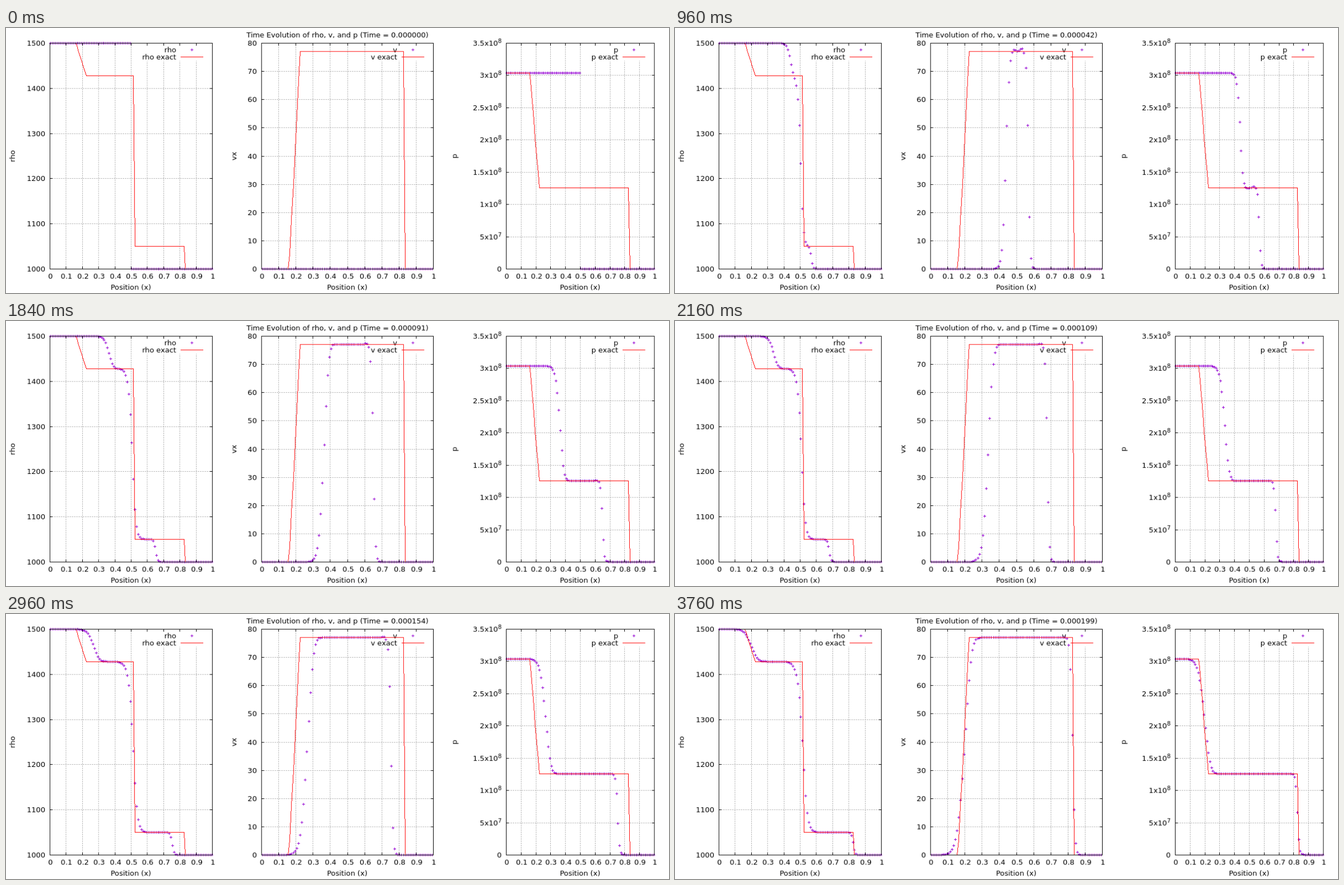
Recreate the animation shown at these times as an HTML page with a canvas. Size 1183 by 473 pixels, loop 3.84 s.

```html
<!DOCTYPE html>
<html lang="en">
<head>
<meta charset="utf-8">
<title>Time Evolution of rho, v, and p</title>
<style>
  html, body { margin: 0; width: 100%; height: 100%; overflow: hidden; background: #fff; }
  canvas { display: block; }
</style>
</head>
<body>
<canvas id="stage" width="1183" height="473"></canvas>
<script>
// The plot is drawn on a 1200 x 480 sheet and scaled smoothly to the stage
const stage = document.getElementById('stage');
const view = stage.getContext('2d');
const sheet = document.createElement('canvas');
sheet.width = 1200;
sheet.height = 480;
const ctx = sheet.getContext('2d');

const TOP = 27, BOTTOM = 436, FONT = 13.1;
const STEP = 80, STEPS = 48, CELLS = 100;

// Stiffened gas shock tube
const G = 7.15, B = 3e8;
const RHO_L = 1500, P_L = 3.04e8, RHO_R = 1000, P_R = 1e5;
const C_L = Math.sqrt(G * (P_L + B) / RHO_L);
const C_R = Math.sqrt(G * (P_R + B) / RHO_R);
const V = 77.06;
const fan = v => 1 - v * (G - 1) / (2 * C_L);
const fanRho = v => RHO_L * fan(v) ** (2 / (G - 1));
const fanP = v => (P_L + B) * fan(v) ** (2 * G / (G - 1)) - B;
const shockP = v => P_R + RHO_R * v * (C_R + 2.13 * v);
const shockRho = v => RHO_R * ((shockP(v) + B) / (P_R + B)) ** (1 / G);
const CONTACT_JUMP = fanRho(V) - shockRho(V);

// Combines the three waves: fan velocity, contact share, shock velocity
function state(vFan, share, vShock) {
  return {
    rho: fanRho(vFan) - CONTACT_JUMP * (1 - share) - shockRho(V) + shockRho(vShock),
    v: vFan * vShock / V,
    p: fanP(vFan) - shockP(V) + shockP(vShock)
  };
}

const softplus = (z, w) => Math.max(z, 0) + w * Math.log1p(Math.exp(-Math.abs(z) / w));
const falling = (z, w) => 1 / (1 + Math.exp(z / w));
const bump = z => Math.exp(-z * z);

// Numerical solution at t microseconds, smeared by the scheme
function numeric(x, t) {
  const r = t / 42, start = 1 - Math.exp(-t / 6);
  const head = 0.5 + 0.0005 * start - 0.001677 * t;
  const tail = 0.5 + 0.01 * start - 0.001381 * t;
  const contact = 0.5 + 0.001 * start + 0.000083 * t;
  const shock = 0.5 + 0.001638 * t;
  const ripple = Math.min(r, 1 / r);

  const ramp = softplus(x - head, 0.01 * r ** 0.38) - softplus(x - tail, 0.0075 * r ** 0.3);
  const vFan = V * ramp / (tail - head) + 0.7 * ripple * bump((x - tail - 0.033) / 0.012);
  const z = x - contact;
  const share = falling(z, (z < 0 ? 0.01075 : 0.00833) * r ** 0.303);
  const vShock = V * falling(x - shock, 0.0038 * t ** 0.1 * start)
    + 1.1 * ripple * bump((x - shock + 0.036) / 0.015);
  return state(vFan, share, vShock);
}

function exact(x) {
  const t = 2e-4, head = 0.5 - C_L * t;
  const tail = head + (G + 1) / 2 * V * t;
  const ramp = Math.min(1, Math.max(0, (x - head) / (tail - head)));
  return state(V * ramp, x < 0.5 + V * t ? 1 : 0, x < 0.5 + 1633 * t ? V : 0);
}

const xs = Array.from({ length: CELLS }, (_, i) => (i + 0.5) / CELLS);
const exactStates = xs.map(exact);

const power = v => {
  if (!v) return ['0', ''];
  const e = Math.floor(Math.log10(v) + 1e-9);
  return [+(v / 10 ** e).toFixed(1) + 'x10', String(e)];
};
const plain = v => [String(v), ''];

const panels = [
  { key: 'rho', axis: 'rho', left: 79, right: 373, min: 1000, max: 1500, tick: 100, label: plain, axisX: 16, keyFrom: 0.6 },
  { key: 'v', axis: 'vx', left: 462, right: 773, min: 0, max: 80, tick: 10, label: plain, axisX: 417, keyFrom: 0.7 },
  { key: 'p', axis: 'p', left: 905, right: 1173, min: 0, max: 3.5e8, tick: 5e7, label: power, axisX: 816, keyFrom: 0.6 }
];

const px = (p, x) => Math.round(p.left + (p.right - p.left) * x);
const py = (p, v) => Math.round(BOTTOM - (BOTTOM - TOP) * (v - p.min) / (p.max - p.min));

function text(s, x, y, align = 'center', size = FONT) {
  ctx.font = size + 'px "DejaVu Sans", sans-serif';
  ctx.textAlign = align;
  ctx.fillText(s, x, y);
}

function dotted(x1, y1, x2, y2) {
  ctx.beginPath();
  ctx.moveTo(x1 + 0.5, y1 + 0.5);
  ctx.lineTo(x2 + 0.5, y2 + 0.5);
  ctx.stroke();
}

// Hard-edged line, one pixel wide
function pixelLine(x1, y1, x2, y2) {
  const n = Math.max(Math.abs(x2 - x1), Math.abs(y2 - y1), 1);
  for (let i = 0; i <= n; i++) {
    ctx.fillRect(Math.round(x1 + (x2 - x1) * i / n), Math.round(y1 + (y2 - y1) * i / n), 1, 1);
  }
}

function plus(x, y) {
  ctx.fillRect(x - 2, y, 5, 1);
  ctx.fillRect(x, y - 2, 1, 5);
}

function eachTick(p, onX, onY) {
  for (let i = 0; i <= 10; i++) onX(i / 10, px(p, i / 10));
  for (let v = p.min; v <= p.max; v += p.tick) onY(v, py(p, v));
}

function drawGrid(p) {
  ctx.strokeStyle = '#a0a0a0';
  ctx.lineWidth = 1;
  ctx.setLineDash([2, 2]);
  eachTick(p,
    (v, x) => {
      if (v > 0 && v < 1) dotted(x, BOTTOM, x, v >= p.keyFrom ? 59 : TOP);
    },
    (v, y) => {
      if (y > TOP && y < BOTTOM) dotted(p.left, y, p.right, y);
    });
  ctx.setLineDash([]);
}

function drawAxes(p) {
  ctx.fillStyle = '#000';
  const w = p.right - p.left, h = BOTTOM - TOP;
  for (const y of [TOP, BOTTOM]) ctx.fillRect(p.left, y, w + 1, 1);
  for (const x of [p.left, p.right]) ctx.fillRect(x, TOP, 1, h + 1);
  eachTick(p,
    (v, x) => {
      ctx.fillRect(x, TOP, 1, 5);
      ctx.fillRect(x, BOTTOM - 4, 1, 5);
      text(String(v), x + 1.5, 453.5);
    },
    (v, y) => {
      ctx.fillRect(p.left, y, 5, 1);
      ctx.fillRect(p.right - 4, y, 5, 1);
      const [base, exp] = p.label(v);
      const end = p.left - 8;
      text(base, end - (exp ? 6.7 : 0), y + 5, 'right');
      if (exp) text(exp, end, y, 'right', 10.4);
    });
  text('Position (x)', (p.left + p.right) / 2, 473.5);
  ctx.save();
  ctx.translate(p.axisX, 232);
  ctx.rotate(-Math.PI / 2);
  text(p.axis, 0, 0);
  ctx.restore();
}

function drawData(p, states) {
  ctx.fillStyle = '#000';
  text(p.key, p.right - 65, 43.5, 'right');
  text(p.key + ' exact', p.right - 65, 56.5, 'right');

  ctx.fillStyle = '#9400d3';
  plus(p.right - 37, 39);
  states.forEach((s, i) => plus(px(p, xs[i]), py(p, s[p.key])));

  ctx.fillStyle = '#f00';
  ctx.fillRect(p.right - 57, 52, 41, 1);
  for (let i = 1; i < CELLS; i++) {
    pixelLine(px(p, xs[i - 1]), py(p, exactStates[i - 1][p.key]),
      px(p, xs[i]), py(p, exactStates[i][p.key]));
  }
}

// The first four time steps are shortened
const simTime = k => k < 4 ? 1.485 * k : 4.495 * k - 12.04;

function draw(k) {
  const t = simTime(k);
  const states = xs.map(x => numeric(x, Math.max(t, 1e-3)));
  ctx.fillStyle = '#fff';
  ctx.fillRect(0, 0, sheet.width, sheet.height);
  for (const p of panels) {
    drawGrid(p);
    drawData(p, states);
    drawAxes(p);
  }
  text(`Time Evolution of rho, v, and p (Time = ${(t * 1e-6).toFixed(6)})`, 600, 17);
  view.drawImage(sheet, 0, 0, stage.width, stage.height);
}

let shown = -1;
function tick() {
  const k = Math.floor(performance.now() / STEP) % STEPS;
  if (k !== shown) draw(shown = k);
  requestAnimationFrame(tick);
}
tick();
</script>
</body>
</html>
```
